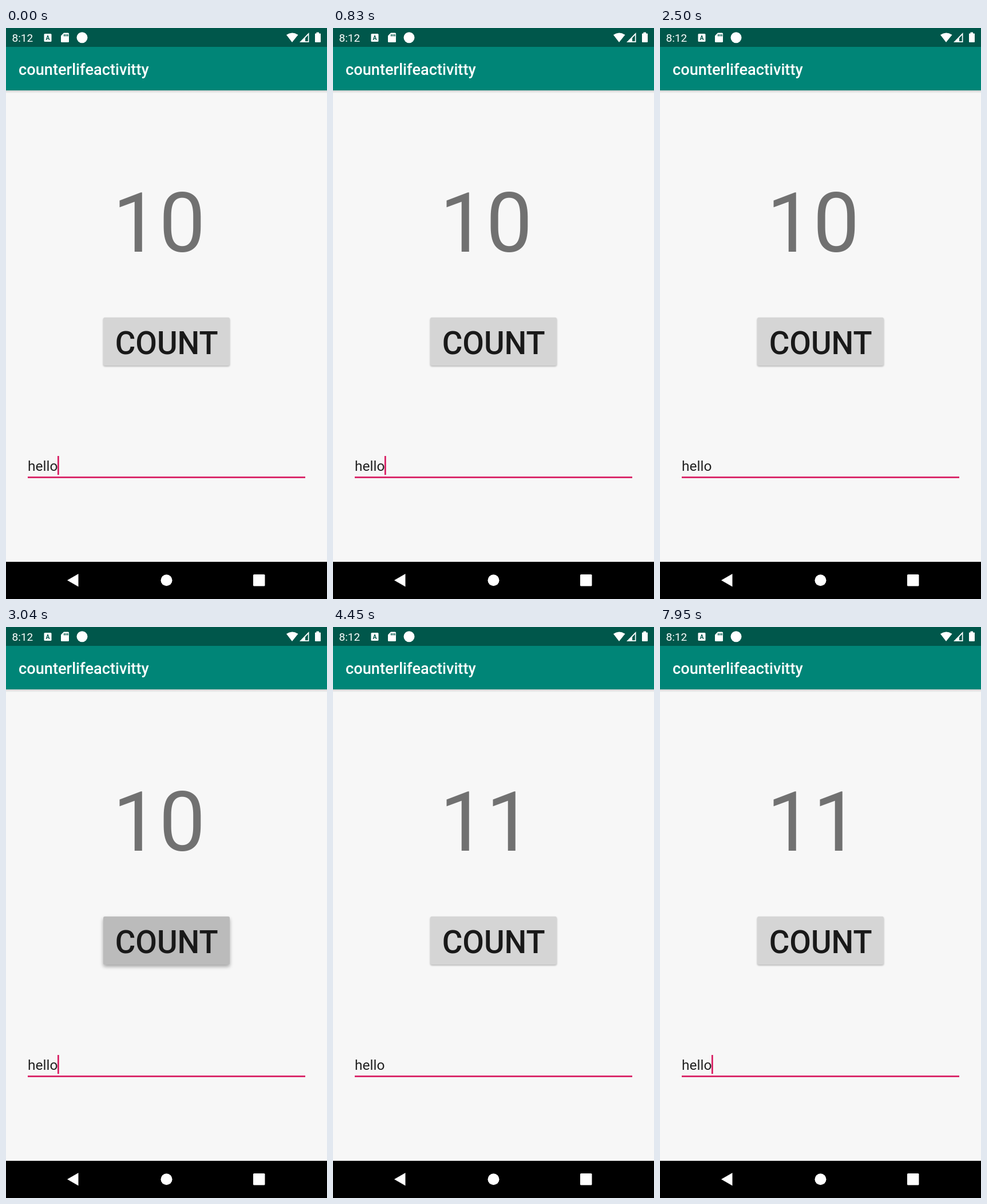
Animation of 561x998 px, one loop 8000 ms. Source, as an HTML page:

```html
<!DOCTYPE html>
<html lang="en">
<head>
<meta charset="utf-8">
<title>Counter</title>
<style>
  html, body { margin: 0; width: 100%; height: 100%; overflow: hidden; background: #f7f7f7; }
  svg { display: block; width: 561px; height: 998px; font-family: Roboto, sans-serif; }
  .mid { font-weight: 500; }
</style>
</head>
<body>
<svg viewBox="0 0 561 998" xmlns="http://www.w3.org/2000/svg">
  <defs>
    <linearGradient id="fade" x2="0" y2="1">
      <stop stop-color="#000" stop-opacity=".16"/>
      <stop offset="1" stop-color="#000" stop-opacity="0"/>
    </linearGradient>
    <filter id="blur" x="-10%" y="-20%" width="120%" height="150%">
      <feGaussianBlur id="soft" stdDeviation="1.5"/>
    </filter>
    <clipPath id="face"><rect x="170" y="506" width="221" height="84" rx="2.7"/></clipPath>
  </defs>

  <rect width="561" height="998" fill="#f7f7f7"/>
  <rect y="109" width="561" height="5" fill="url(#fade)"/>
  <rect y="33" width="561" height="76" fill="#008577"/>
  <rect width="561" height="33" fill="#00574b"/>

  <g fill="#fff">
    <text x="10.5" y="23.5" font-size="19.1">8:12</text>
    <rect x="66.5" y="10" width="13" height="14" rx="1.5"/>
    <path d="M101 8.500h7.500q1.500 0 1.500 1.500v13.500q0 1.500 -1.500 1.500h-11q-1.500 0 -1.500 -1.500v-10z"/>
    <circle cx="133" cy="16.800" r="9.500"/>
    <path d="M500 25L490 12Q500 5 510.500 12Z"/>
    <path d="M513 25L529.500 8V25Z"/>
    <path d="M542.500 9.500V7.500h4.500v2h2q1 0 1 1V24q0 1 -1 1h-8q-1 0 -1 -1V10.500q0 -1 1 -1z"/>
    <text class="mid" x="22" y="81.500" font-size="27.200">counterlifeactivitty</text>
  </g>
  <g fill="#00574b">
    <text x="73" y="20.500" font-size="10.500" font-weight="700" text-anchor="middle">A</text>
    <path d="M101 11h1.700v3.500h-1.700zM104 11h1.700v3.500h-1.700zM107 11h1.700v3.500h-1.700z"/>
    <path d="M523 17.500L527.800 12.500V23.300H523Z"/>
  </g>

  <text id="count" x="186.500" y="391" font-size="144" fill="#717171">10</text>

  <rect id="shade" x="170" y="507.500" width="221" height="84" rx="3" filter="url(#blur)"/>
  <g clip-path="url(#face)">
    <rect x="170" y="506" width="221" height="84" fill="#d5d5d5"/>
    <circle id="ripple" cx="280.500" cy="548"/>
  </g>
  <text class="mid" x="280.700" y="570" font-size="54.600" text-anchor="middle" fill="#191919">COUNT</text>

  <text x="38" y="774" font-size="24.500" fill="#212121">hello</text>
  <rect id="caret" x="90" y="748" width="2.700" height="33" fill="#d81b60"/>
  <rect x="38" y="784" width="485" height="2.700" fill="#d81b60"/>

  <rect y="933" width="561" height="65"/>
  <g fill="#fff">
    <path d="M107 965.300L126.500 954V976.500Z"/>
    <circle cx="280.500" cy="965.300" r="10"/>
    <rect x="432" y="955" width="20.500" height="20.500" rx="1.500"/>
  </g>
</svg>
<script>
  const LOOP = 8000, PRESS = 2800, RELEASE = 3290;
  const el = id => document.getElementById(id);
  const [count, shade, soft, ripple, caret] =
    ["count", "shade", "soft", "ripple", "caret"].map(el);

  // Eased progress from 0 to 1 between two times
  function ease(t, from, to) {
    const p = Math.min(1, Math.max(0, (t - from) / (to - from)));
    return p * p * (3 - 2 * p);
  }

  function draw(t) {
    const lift = ease(t, PRESS, PRESS + 150) - ease(t, RELEASE, RELEASE + 150);
    const tint = ease(t, PRESS, PRESS + 100) - ease(t, RELEASE, RELEASE + 400);
    const blink = t > 2370 && t < 4870 && (t - 2370) % 1000 < 500;

    count.textContent = t < RELEASE ? 10 : 11;
    ripple.setAttribute("r", 20 + 105 * ease(t, PRESS, PRESS + 230));
    ripple.setAttribute("opacity", 0.122 * tint);
    shade.setAttribute("y", 507.5 + 2 * lift);
    shade.setAttribute("opacity", 0.28 + 0.06 * lift);
    soft.setAttribute("stdDeviation", 1.5 + 1.8 * lift);
    caret.setAttribute("opacity", blink ? 0 : 1);
  }

  let start;
  function tick(now) {
    start ??= now;
    draw((now - start) % LOOP);
    requestAnimationFrame(tick);
  }
  draw(0);
  requestAnimationFrame(tick);
</script>
</body>
</html>
```
